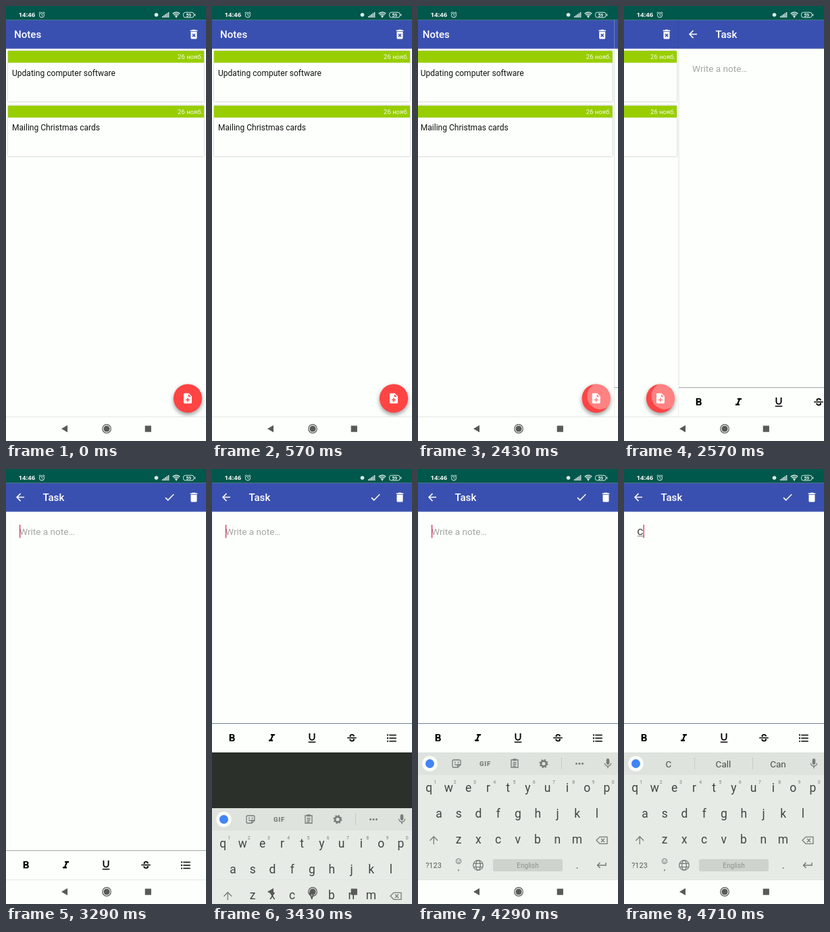
Recreate the animation shown at these times as an HTML page. Size 296 by 640 pixels, loop 5.01 s.

```html
<!DOCTYPE html>
<html lang="en">
<head>
<meta charset="utf-8">
<title>Adding a note</title>
<style>
  html, body { margin: 0; width: 100%; height: 100%; overflow: hidden; background: #fdfffd; }
  svg { display: block; width: 296px; height: 640px; font-family: Roboto, sans-serif; }
  .card { filter: drop-shadow(0 .7px 1px #0005); }
  .fab { filter: drop-shadow(0 3px 3px #0006); }
  .bar { filter: drop-shadow(0 .8px .8px #0003); }
  .line { fill: none; stroke: #777c78; stroke-width: 1.3; }
</style>
</head>
<body>
<svg id="stage" viewBox="0 0 296 640"></svg>
<script>
const LOOP = 5010, WIDTH = 296, DP = .754, PAPER = '#fdfffd', GREY = '#777c78';
const BAR_TOP = 20.5, BAR_MID = 41.6, KEY_STEP = 29.25;

const ICONS = {
  trash: 'M6 19c0 1.1.9 2 2 2h8c1.1 0 2-.9 2-2V7H6zM19 4h-3.5l-1-1h-5l-1 1H5v2h14z',
  trashX: 'M6 19c0 1.1.9 2 2 2h8c1.1 0 2-.9 2-2V7H6zm2.46-7.12 1.41-1.41L12 12.59l2.12-2.12 1.41 1.41L13.41 14l2.12 2.12-1.41 1.41L12 15.41l-2.12 2.12-1.41-1.41L10.59 14zM15.5 4l-1-1h-5l-1 1H5v2h14V4z',
  check: 'M9 16.17 4.83 12l-1.42 1.41L9 19 21 7l-1.41-1.41z',
  back: 'M20 11H7.83l5.59-5.59L12 4l-8 8 8 8 1.41-1.41L7.83 13H20z',
  noteAdd: 'M14 2H6c-1.1 0-2 .9-2 2v16c0 1.1.9 2 2 2h12c1.1 0 2-.9 2-2V8zm2 14h-3v3h-2v-3H8v-2h3v-3h2v3h3zm-3-7V3.5L18.5 9z',
  bold: 'M15.6 10.79c.97-.67 1.65-1.77 1.65-2.79 0-2.26-1.75-4-4-4H7v14h7.04c2.09 0 3.71-1.7 3.71-3.79 0-1.52-.86-2.82-2.15-3.42zM10 6.5h3a1.5 1.5 0 0 1 0 3h-3zm3.5 9H10v-3h3.5a1.5 1.5 0 0 1 0 3z',
  italic: 'M10 4v3h2.21l-3.42 8H6v3h8v-3h-2.21l3.42-8H18V4z',
  underline: 'M12 17c3.31 0 6-2.69 6-6V3h-2.5v8a3.5 3.5 0 0 1-7 0V3H6v8c0 3.31 2.69 6 6 6zm-7 2v2h14v-2z',
  list: [5, 11, 17].map(y => `M7 ${y}h14v2H7zM2.5 ${y + 1}a1.5 1.5 0 1 0 3 0a1.5 1.5 0 1 0-3 0`).join(''),
  mic: 'M12 14c1.66 0 3-1.34 3-3V5a3 3 0 0 0-6 0v6c0 1.66 1.34 3 3 3zm5.3-3c0 3-2.54 5.1-5.3 5.1S6.7 14 6.7 11H5c0 3.41 2.72 6.23 6 6.72V21h2v-3.28c3.28-.48 6-3.3 6-6.72z',
  enter: 'M19 7v4H5.83l3.58-3.59L8 6l-6 6 6 6 1.41-1.41L5.83 13H21V7z'
};

const icon = (name, x, y, fill) =>
  `<path d="${ICONS[name]}" fill="${fill}" fill-rule="evenodd" transform="translate(${x} ${y}) scale(${DP}) translate(-12 -12)"/>`;
const text = (x, y, size, str, fill, more = '') =>
  `<text x="${x}" y="${y}" font-size="${size}" fill="${fill}" ${more}>${str}</text>`;
const mid = (x, y, size, str, fill, more = '') => text(x, y, size, str, fill, 'text-anchor="middle" ' + more);
const rect = (x, y, w, h, fill, more = '') =>
  `<rect x="${x}" y="${y}" width="${w}" height="${h}" fill="${fill}" ${more}/>`;
const circle = (x, y, r, fill, more = '') => `<circle cx="${x}" cy="${y}" r="${r}" fill="${fill}" ${more}/>`;
const path = (d, more = 'class="line"') => `<path d="${d}" ${more}/>`;
const group = (id, ...parts) => `<g id="${id}">${parts.join('')}</g>`;

const appBar = (title, x) =>
  rect(0, BAR_TOP, WIDTH, 56 * DP, '#3a50b0', 'class="bar"') +
  text(x, 47.1, 20 * DP, title, '#fff', 'font-weight="500"');

const card = (y, title) =>
  `<g class="card">${rect(3, y, 290, 74.5, PAPER)}${rect(3, y, 290, 17.5, '#98ce00')}</g>` +
  text(291, y + 12.4, 9.5, '26 нояб.', '#f6fbe6', 'text-anchor="end"') +
  text(9, y + 36.7, 16 * DP, title, '#111');

function listPage() {
  const radius = 28 * DP;
  return group('list',
    rect(0, BAR_TOP, WIDTH, 584, PAPER),
    appBar('Notes', 12), icon('trashX', 278, BAR_MID, '#fff'),
    card(66, 'Updating computer software'), card(146.7, 'Mailing Christmas cards'),
    circle(269, 577.3, radius, '#ff4444', 'class="fab"'),
    `<clipPath id="round">${circle(269, 577.3, radius, '#000')}</clipPath>`,
    circle(275, 574, 19.5, '#fff', 'id="ripple" fill-opacity=".33" clip-path="url(#round)"'),
    icon('noteAdd', 269, 577.3, '#fff'));
}

function taskPage() {
  return group('task',
    rect(0, BAR_TOP, WIDTH, 584, PAPER), rect(-.5, 64, 1, 540, '#dde3dd'),
    appBar('Task', 54.5),
    icon('back', 21, BAR_MID, '#fff'), icon('check', 242, BAR_MID, '#fff'), icon('trash', 278, BAR_MID, '#fff'),
    text(20, 96.8, 18 * DP, 'Write a note…', '#a3a5a3', 'id="hint"'),
    group('typed', text(19.6, 96.8, 18 * DP, 'C', '#222'), rect(20, 98.4, 9, .8, '#555')),
    rect(20, 82, 1.2, 19.5, '#d81b60', 'id="cursor"'),
    group('format',
      rect(0, 561, WIDTH, 43, PAPER), rect(0, 561, WIDTH, 1, '#9aa5a6', 'id="rule"'),
      icon('bold', 29.5, 583, '#000'), icon('italic', 88.5, 583, '#000'),
      icon('underline', 148, 582.8, '#000'), icon('list', 266, 583, '#000'),
      mid(207, 587.6, 14.2, 'S', '#000', 'font-weight="700"'),
      rect(200.2, 580.9, 13.6, 3.2, PAPER), rect(200.2, 581.8, 13.6, 1.5, '#000')));
}

function letterRow(letters, x0, baseline) {
  return [...letters].map((c, i) =>
    mid(x0 + i * KEY_STEP, baseline, 17.5, c, '#424642', 'class="letter"')).join('');
}

function toolStrip() {
  const sticker = path('M53 428h8q2 0 2 2v5l-4 4h-6q-2 0-2-2v-7q0-2 2-2zM63 435h-4v4M54 434q3 3 6 0') +
    circle(55, 431.5, 1, GREY) + circle(59.5, 431.5, 1, GREY);
  const clipboard = path('M138 428h10v11h-10zM140.5 432h5M140.5 434.5h5M140.5 437h4') +
    rect(140.5, 426.3, 5, 3, GREY);
  const gear = circle(186, 433.5, 3.9, 'none', `stroke="${GREY}" stroke-width="2.6"`) +
    circle(186, 433.5, 5.6, 'none', `stroke="${GREY}" stroke-width="1.8" stroke-dasharray="2.2 2.2"`);
  return group('tools', sticker,
    mid(99.5, 437, 9.6, 'GIF', GREY, 'font-weight="900" letter-spacing=".8"'), clipboard, gear,
    rect(212, 424, 1, 18, '#c8cdc8'),
    [234.5, 239, 243.5].map(x => circle(x, 433.5, 1.5, GREY)).join(''));
}

function keyboard() {
  const hints = [...'1234567890'].map((n, i) => mid(25.5 + i * KEY_STEP, 463, 7, n, '#7d827d')).join('');
  const suggestions = group('suggestions',
    [['C', 66], ['Call', 147], ['Can', 228]].map(([word, x]) => mid(x, 438.7, 18 * DP, word, '#4a4e4a')).join(''),
    rect(104, 424, 1, 18, '#c8cdc8'), rect(190, 424, 1, 18, '#c8cdc8'));
  const smiley = circle(60, 577, 3.8, 'none', 'class="line" style="stroke-width:1"') +
    circle(58.6, 576, .7, GREY) + circle(61.4, 576, .7, GREY) +
    path('M58 578q2 2 4 0', 'class="line" style="stroke-width:.9"');
  const globe = circle(89, 583, 7.3, 'none', 'class="line"') +
    '<ellipse cx="89" cy="583" rx="3.3" ry="7.3" class="line"/>' + path('M82.5 580.3h13M82.5 585.7h13');
  return group('keyboard',
    rect(0, 417, WIDTH, 223, '#e7ebe6'), rect(0, 417, WIDTH, 33, '#dee3dd'),
    circle(17.5, 433.5, 11.3, '#fbfdfb'), circle(17.5, 433.5, 6.5, '#4285f4'),
    toolStrip(), suggestions, icon('mic', 281, 433.5, GREY),
    letterRow('qwertyuiop', 16.2, 475), hints,
    letterRow('asdfghjkl', 31, 513), letterRow('zxcvbnm', 60, 551),
    path('M17.5 546.8l5.8-6 5.8 6M23.3 541.3v11', 'id="shift" class="line"'),
    path('M269 541.3h11v10h-11l-5-5zM271 543.6l5 5.4M276 543.6l-5 5.4'),
    mid(23, 587, 11, '?123', '#5a5e5a'), smiley, mid(60, 590, 11, ',', '#424642'), globe,
    rect(111, 574, 103, 18, '#ced3ce', 'rx="2.5"'), mid(162.5, 586.5, 10, 'English', '#8d928d'),
    mid(235.5, 587.5, 14, '.', '#424642'), icon('enter', 272, 583, GREY),
    group('popup', rect(103.5, 491, 29, 74, '#f8faf7', 'rx="4" class="card"'),
      mid(118, 518, 20, 'C', '#333733')));
}

function statusBar() {
  const bars = [2, 3.5, 5, 6.5, 8].map((h, i) => rect(231 + i * 2.2, 17 - h, 1.5, h, '#dcebe7')).join('');
  const waves = [2.6, 4.8, 7].map(r =>
    path(`M${252 - r * .76} ${17 - r * .8}q${r * .76} ${-r * .6} ${r * 1.52} 0`,
      'fill="none" stroke="#dcebe7" stroke-width="1.4"')).join('');
  return rect(0, 0, WIDTH, BAR_TOP, '#00574b') +
    text(18.5, 16.4, 9.6, '14:46', '#eef7f4', 'font-weight="700" font-family="Noto Sans, sans-serif"') +
    circle(53, 13.3, 3.6, 'none', 'stroke="#dcebe7"') +
    path('M53 11v2.5l1.5 1M48.6 10.4l2.2-1.9M57.4 10.4l-2.2-1.9', 'fill="none" stroke="#dcebe7"') +
    circle(222.5, 13, 2.8, '#dcebe7') + bars + waves + circle(252, 16.2, 1.1, '#dcebe7') +
    rect(262.5, 9.3, 15.5, 7.6, 'none', 'rx="3" stroke="#dcebe7"') + rect(279, 11.5, 1.2, 3.2, '#dcebe7') +
    mid(270.2, 15.6, 6.6, '59', '#eef7f4', 'font-weight="700"');
}

function navBar() {
  return rect(0, 604, WIDTH, 36, PAPER, 'id="navBack"') + rect(0, 604, WIDTH, 1, '#e2e6e2') +
    path('M82 622l9-5.3v10.6z', 'fill="#575a57"') +
    circle(149, 622, 6.3, 'none', 'stroke="#575a57" stroke-width="1.2"') + circle(149, 622, 4.6, '#575a57') +
    rect(205.7, 617.5, 9.2, 9.2, '#575a57');
}

document.getElementById('stage').innerHTML = listPage() + taskPage() +
  rect(0, 417, WIDTH, 223, '#2b302b', 'id="gap"') + keyboard() + navBar() + statusBar();

const el = id => document.getElementById(id);
const show = (id, on) => el(id).setAttribute('visibility', on ? 'visible' : 'hidden');
const move = (id, x, y) => el(id).setAttribute('transform', `translate(${x} ${y})`);
const letters = [...document.querySelectorAll('.letter')].map(node => ({ node, key: node.textContent }));

// The screen shows about 7 pictures a second, so every pose is held.
function draw(t) {
  const slide = t < 2430 ? 0 : t < 2570 ? 5.3 : t < 2710 ? 215 : WIDTH;
  move('list', -slide, 0);
  move('task', WIDTH - slide, 0);
  show('list', slide < WIDTH);
  show('task', slide > 0);
  show('ripple', slide > 0 && slide < WIDTH);

  const open = t >= 3430, rising = open && t < 3570;
  const typed = t >= 4710, upper = t >= 4430 && !typed;
  move('format', 0, open ? -187 : 0);
  el('rule').setAttribute('fill', open ? '#6f8296' : '#a4a9a6');
  show('gap', rising);
  show('keyboard', open);
  move('keyboard', 0, rising ? 82 : 0);
  show('navBack', !rising);

  show('cursor', (t >= 3290 && t < 3710) || t >= 4290);
  move('cursor', typed ? 8.6 : 0, 0);
  show('hint', slide > 0 && !typed);
  show('typed', typed);
  show('tools', open && !typed);
  show('suggestions', typed);
  show('popup', upper && t >= 4570);
  el('shift').style.strokeWidth = upper ? 2.4 : 1.3;
  for (const { node, key } of letters) {
    const label = upper ? key.toUpperCase() : key;
    if (node.textContent !== label) node.textContent = label;
  }
}

function tick() {
  draw(performance.now() % LOOP);
  requestAnimationFrame(tick);
}
tick();
</script>
</body>
</html>
```
